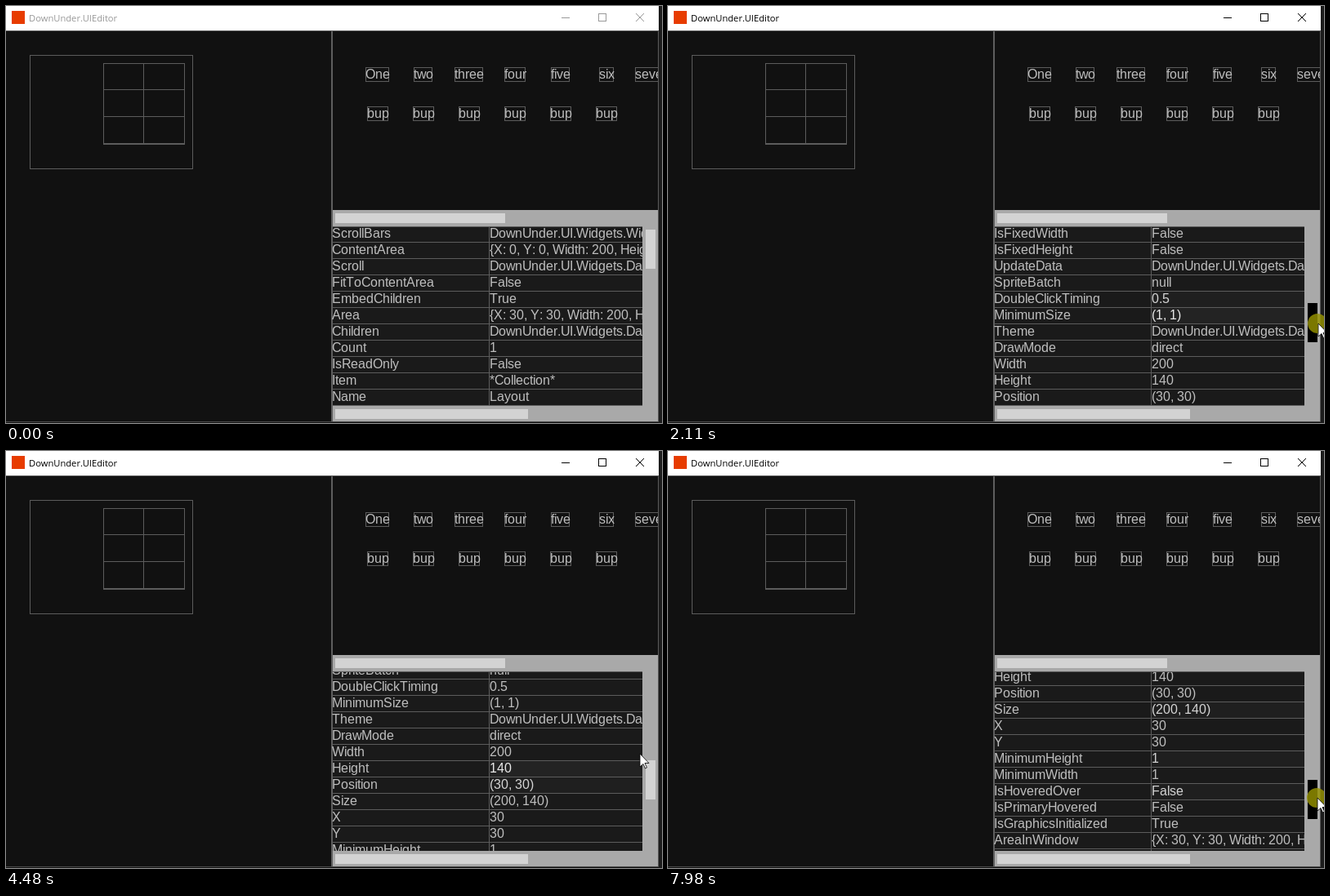
Recreate the animation shown at these times as an HTML page with a canvas. Size 803 by 511 pixels, loop 8 s.

```html
<!DOCTYPE html>
<html lang="en">
<head>
<meta charset="utf-8">
<title>DownUnder.UIEditor</title>
<style>
html, body { margin: 0; width: 100%; height: 100%; overflow: hidden; background: #111; }
canvas { display: block; }
</style>
</head>
<body>
<canvas id="stage" width="803" height="511"></canvas>
<script>
const ctx = document.getElementById('stage').getContext('2d');
const LOOP = 8000, STEP = 80;
const BG = '#111', LINE = '#5c5c5c', BAR = '#a9a9a9', THUMB = '#d3d3d3';
const GRID = { x: 400, y: 270, right: 779, bottom: 490, split: 591, row: 20 };
const PX_PER_THUMB = 4.65;

const rows = `ScrollBars|DownUnder.UI.Widgets.Widget
ContentArea|{X: 0, Y: 0, Width: 200, Height: 140}
Scroll|DownUnder.UI.Widgets.DataTypes
FitToContentArea|False
EmbedChildren|True
Area|{X: 30, Y: 30, Width: 200, Height: 140}
Children|DownUnder.UI.Widgets.DataTypes
Count|1
IsReadOnly|False
Item|*Collection*
Name|Layout
ChangeColorOnHover|True
DrawBackground|True
DrawOutline|True
OutlineThickness|1
OutlineSides|{up:True left:True right:True down:True}
SnappingPolicy|{top_right:False top_left:True}
Centered|False
Spacing|Width: 30, Height: 30
EnterConfirms|True
PaletteUsage|default_widget
IsFixedWidth|False
IsFixedHeight|False
UpdateData|DownUnder.UI.Widgets.DataTypes
SpriteBatch|null
DoubleClickTiming|0.5
MinimumSize|(1, 1)
Theme|DownUnder.UI.Widgets.DataTypes
DrawMode|direct
Width|200
Height|140
Position|(30, 30)
Size|(200, 140)
X|30
Y|30
MinimumHeight|1
MinimumWidth|1
IsHoveredOver|False
IsPrimaryHovered|False
IsGraphicsInitialized|True
AreaInWindow|{X: 30, Y: 30, Width: 200, Height: 140}
VisibleArea|{X: 30, Y: 30, Width: 200, Height: 140}`.split('\n').map(r => r.split('|'));

const lerp = (a, b, k) => a + (b - a) * k;
const gray = (a, b, k) => {
  const v = Math.round(lerp(a, b, k));
  return `rgb(${v},${v},${v})`;
};

function ease(t, from, to) {
  const k = Math.min(1, Math.max(0, (t - from) / (to - from)));
  return k * k * (3 - 2 * k);
}

// Each move: start, end, then how far it goes
const sumMoves = (moves, t, col = 2) =>
  moves.reduce((sum, m) => sum + m[col] * ease(t, m[0], m[1]), 0);

const ENTER = 110, PRESS = 870, RELEASE = 4150, PRESS_AGAIN = 7600;
const scrollMoves = [
  [PRESS, 1710, 381], [1710, 2110, 39], [2350, 2590, -32],
  [2830, 3550, 70], [3630, 3790, 32], [7630, 7910, 112]
];
const mouseMoves = [
  [ENTER, PRESS, 95, -201], [2350, 3550, 3, 105], [RELEASE, 4790, -57, -80],
  [4950, 5190, -12, 11], [5390, 5750, -92, 14], [6070, 6550, 18, 51],
  [6780, 7070, 45, 52], [7070, 7590, 94, -51]
];

const scrollAt = t => Math.round(sumMoves(scrollMoves, t));
const thumbAt = t => 274 + scrollAt(t) / PX_PER_THUMB;
const isDragging = t => (t >= PRESS && t < RELEASE) || t >= PRESS_AGAIN;
const thumbShade = t => ease(t, 740, 900) - ease(t, RELEASE, 4400) + ease(t, 7420, PRESS_AGAIN);

function mouseAt(t) {
  const grab = t < RELEASE ? 25 : 22;
  return {
    x: 700 + sumMoves(mouseMoves, t),
    y: isDragging(t) ? thumbAt(t) + grab : 500 + sumMoves(mouseMoves, t, 3)
  };
}

function hoveredRow(t) {
  if (t < ENTER) return -1;
  const y = mouseAt(t).y - 2;
  if (y < GRID.y || y > GRID.bottom) return -1;
  return Math.floor((y - GRID.y + scrollAt(t)) / GRID.row);
}

// Highlight follows the mouse with a short fade
function glowAt(t) {
  const glow = {};
  for (let lag = 1; lag <= 3; lag++) {
    const row = hoveredRow(t - lag * STEP);
    glow[row] = (glow[row] || 0) + 1 / 3;
  }
  return glow;
}

function rect(x, y, w, h, color) {
  ctx.fillStyle = color;
  ctx.fillRect(x, y, w, h);
}

function frame(x, y, w, h, color = LINE) {
  ctx.strokeStyle = color;
  ctx.lineWidth = 1;
  ctx.strokeRect(x + .5, y + .5, w - 1, h - 1);
}

// Bitmap-font look: every glyph advances by whole pixels
const FONT = '16px "Liberation Sans", Arial, sans-serif';
const advances = {};
function advance(ch) {
  if (!(ch in advances)) {
    ctx.font = FONT;
    advances[ch] = Math.round(ctx.measureText(ch).width - .06);
  }
  return advances[ch];
}
const textWidth = s => [...s].reduce((w, ch) => w + advance(ch), 0);

function text(s, x, y, color = '#bebebe') {
  ctx.font = FONT;
  ctx.fillStyle = color;
  for (const ch of s) {
    ctx.fillText(ch, x, y);
    x += advance(ch);
  }
}

function clipped(x, y, w, h, draw) {
  ctx.save();
  ctx.beginPath();
  ctx.rect(x, y, w, h);
  ctx.clip();
  draw();
  ctx.restore();
}

function titleBar(active) {
  rect(0, 0, 799, 30, '#fff');
  rect(7, 6, 16, 16, '#e73c00');
  const ink = active ? '#000' : '#999';
  ctx.font = '11.2px "Open Sans", "Noto Sans", sans-serif';
  ctx.fillStyle = ink;
  ctx.fillText('DownUnder.UIEditor', 28, 19);
  rect(680, 14, 10, 1, ink);
  frame(725, 9, 10, 10, ink);
  ctx.beginPath();
  ctx.moveTo(771, 9);
  ctx.lineTo(781, 19);
  ctx.moveTo(781, 9);
  ctx.lineTo(771, 19);
  ctx.stroke();
}

function layoutPanel() {
  frame(29, 60, 200, 140);
  frame(119, 70, 100, 100);
  rect(168, 70, 1, 100, LINE);
  for (const y of [102, 135, 168]) rect(119, y, 100, 1, LINE);
}

function label(s, col, y) {
  const w = textWidth(s) - 1, x = Math.floor(455 + 56 * col - w / 2);
  frame(x, y, w, 18);
  text(s, x, y + 14);
}

function labelPanel() {
  clipped(400, 31, 398, 219, () => {
    ['One', 'two', 'three', 'four', 'five', 'six', 'seven'].forEach((s, i) => label(s, i, 75));
    for (let i = 0; i < 6; i++) label('bup', i, 123);
  });
}

function propertyGrid(t) {
  const { x, y, right, bottom, split, row } = GRID;
  const scroll = scrollAt(t), glow = glowAt(t);
  rect(x, y, right - x, bottom - y, '#1a1a1a');
  clipped(x - 1, y, right - x + 1, bottom - y, () => {
    rows.forEach(([name, value], i) => {
      const top = y + i * row - scroll;
      if (top < y - row || top > bottom) return;
      const k = glow[i] || 0;
      if (k) rect(split, top, right - split, row, gray(26, 40, k));
      text(name, 399, top + 14);
      text(value, split + 1, top + 14, gray(190, 255, k));
      rect(x, top + row - 1, right - x, 1, LINE);
    });
    rect(split, y, 1, bottom - y, LINE);
    rect(x, y, right - x, 1, LINE);
  });
}

function scrollBars(t) {
  rect(400, 250, 398, 20, BAR);
  rect(403, 254, 208, 12, THUMB);
  rect(400, 490, 398, 19, BAR);
  rect(403, 494, 236, 12, THUMB);
  rect(779, 270, 19, 239, BAR);
  rect(783, Math.floor(thumbAt(t)), 12, 48, gray(211, 0, thumbShade(t)));
}

function pointer(t) {
  if (t < ENTER) return;
  const m = mouseAt(t), x = Math.round(m.x), y = Math.round(m.y);
  if (isDragging(t)) {
    ctx.fillStyle = 'rgba(150,146,0,.82)';
    ctx.beginPath();
    ctx.arc(x, y, 12, 0, 7);
    ctx.fill();
  }
  ctx.save();
  ctx.translate(x + 1, y);
  ctx.beginPath();
  const arrow = [[0, 0], [0, 16], [4, 12.5], [6.5, 18], [8.5, 17], [6, 11.5], [11, 11.5]];
  for (const p of arrow) ctx.lineTo(...p);
  ctx.closePath();
  ctx.fillStyle = '#fff';
  ctx.fill();
  ctx.strokeStyle = '#000';
  ctx.lineWidth = .8;
  ctx.stroke();
  ctx.restore();
}

function draw(t) {
  rect(0, 0, 803, 511, BG);
  rect(799, 0, 4, 511, '#1c1c1c');
  titleBar(t >= 910);
  rect(0, 30, 799, 1, '#555');
  layoutPanel();
  labelPanel();
  rect(398, 31, 2, 478, '#5e5e5e');
  propertyGrid(t);
  scrollBars(t);
  rect(798, 31, 1, 479, '#5a5a5a');
  rect(0, 509, 799, 1, '#4a4a4a');
  pointer(t);
}

function tick() {
  const t = performance.now() % LOOP;
  draw(Math.max(0, 30 + STEP * Math.floor((t - 30) / STEP)));
  requestAnimationFrame(tick);
}
tick();
</script>
</body>
</html>
```
